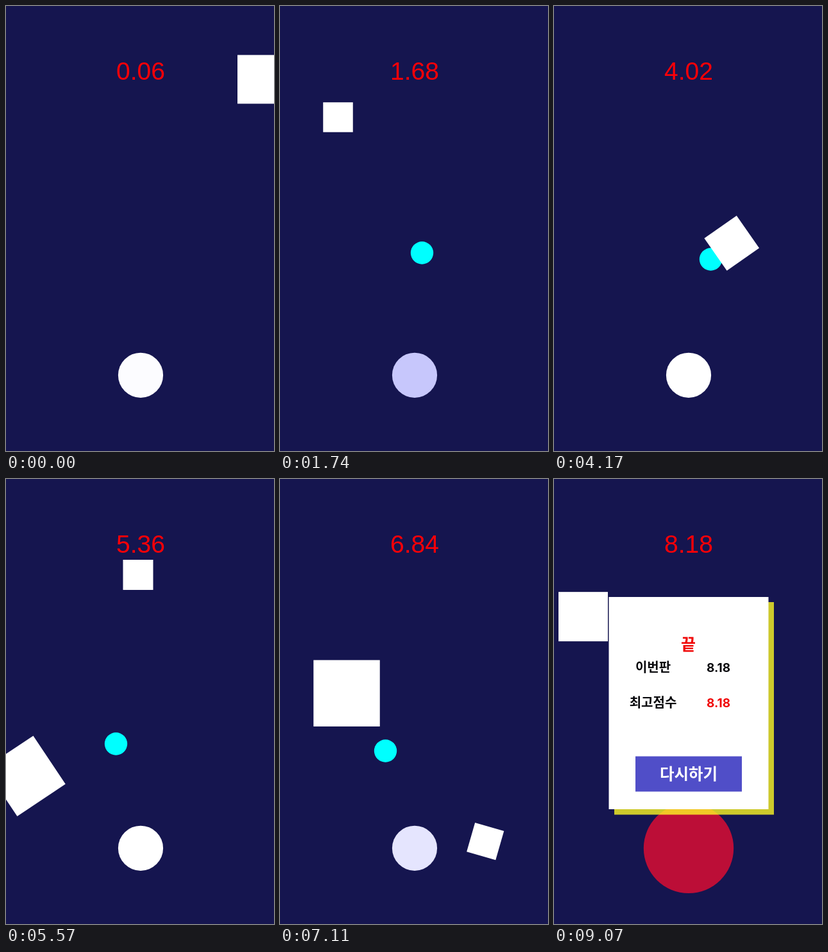
Animation, 418 px wide and 694 px high, one loop 9.34 s. Source, as an HTML page with a canvas:

```html
<!DOCTYPE html>
<html lang="ko">
<head>
<meta charset="utf-8">
<style>
  html, body { margin: 0; height: 100%; overflow: hidden; background: #15154f; }
  canvas { display: block; }
</style>
</head>
<body>
<canvas id="stage" width="418" height="694"></canvas>
<script>
const ctx = document.getElementById('stage').getContext('2d');
const LOOP = 9340, GRAVITY = 681, FIRST_DROP = 0.026;
const SHIELD_TOP = 394, BALLOON_TOP = 541;
const OVER = 8.17, STOP = 8.68, FINAL = '8.18';
const KOREAN = '"Noto Sans CJK KR", "Noto Sans CJK", sans-serif';

// One square drops each second; some bounce off the shield, one off the balloon
const squares = [
  { x: 399, y: 114, size: 76, bounce: { vx: 270, vy: -60, spin: 2.5 } },
  { x: 90.5, y: 26.8, size: 46.5 },
  { x: 409.5, y: 10, size: 67 },
  { x: 247, y: 146, size: 61.5, bounce: { vx: 151, vy: -35, spin: 4.8 } },
  { x: 112, y: 0, size: 90.5, bounce: { vx: -252, vy: 241, spin: -1.81 } },
  { x: 206, y: 110.7, size: 47, bounce: { vx: 122, vy: -111, spin: 0.3 } },
  { x: 104, y: 110.8, size: 103.5, bounce: { vx: -110, vy: 330, spin: -1.8 } },
  { x: 190, y: 58, size: 74, floor: BALLOON_TOP, bounce: { vx: -80, vy: 330, spin: -2 } },
  { x: 45.5, y: 69, size: 77 }
];

// Shield turning points: time, x, y
const path = [
  [0.4, 440, 408], [1.68, 221.5, 385], [2.686, 268.5, 418], [4.025, 244.5, 395],
  [5.363, 171.5, 413], [6.836, 164.5, 424], [8.17, 235, 420]
];

const clamp = v => Math.max(0, Math.min(1, v));
const smooth = v => v * v * (3 - 2 * v);
const mix = (a, b, k) => a + (b - a) * k;
const fall = t => GRAVITY * t * t / 2;

// Screen updates come every 70 ms, a few of them 10 ms early
function tick(ms) {
  if (ms < 140) return 0;
  const early = ms < 600 ? 0 : ms < 2400 ? 10 : 30;
  return 1 + Math.min(128, Math.floor((ms - 140 + early) / 70));
}

function circle(x, y, r, color) {
  ctx.fillStyle = color;
  ctx.beginPath();
  ctx.arc(x, y, r, 0, Math.PI * 2);
  ctx.fill();
}

function rect(x, y, w, h, color) {
  ctx.fillStyle = color;
  ctx.fillRect(x, y, w, h);
}

function label(text, x, y, font, color) {
  ctx.font = font;
  ctx.fillStyle = color;
  ctx.textAlign = 'center';
  ctx.fillText(text, x, y);
}

function drawBalloon(time) {
  const wave = (1 - Math.cos((Math.min(time, OVER) - 0.012) * 3 * Math.PI)) / 2;
  const idle = [255 - 56 * wave, 255 - 56 * wave, 255 - 3 * wave];
  const burst = smooth(clamp((time - OVER) / 0.33));
  const rgb = [188, 14, 55].map((c, i) => Math.round(mix(idle[i], c, burst)));
  circle(210, 575.8, 35.1 * (1 + burst), `rgb(${rgb})`);
}

function drawShield(time) {
  const next = path.findIndex(p => p[0] > time);
  const b = path.at(next);
  const a = next < 1 ? b : path[next - 1];
  const k = a === b ? 0 : smooth((time - a[0]) / (b[0] - a[0]));
  circle(mix(a[1], b[1], k), mix(a[2], b[2], k), 17.7, '#00ffff');
}

function drawSquare({ x, y, size, bounce, floor = SHIELD_TOP }, age) {
  if (age < 0) return;
  const impact = Math.sqrt(2 * (floor - size / 2 - y) / GRAVITY);
  const after = bounce ? Math.max(0, age - impact) : 0;
  const { vx, vy, spin } = bounce || { vx: 0, vy: 0, spin: 0 };
  ctx.save();
  ctx.translate(x + vx * after, y + fall(age - after) + vy * after + fall(after));
  ctx.rotate(spin * after);
  rect(-size / 2, -size / 2, size, size, '#fff');
  ctx.restore();
}

function drawPanel() {
  const small = `bold 20px ${KOREAN}`, digits = 'bold 19px Inter, sans-serif';
  const rows = [['이번판', 301, '#08080c'], ['최고점수', 356, '#f00505']];
  rect(94, 192, 249, 331.5, 'rgba(255,250,35,.79)');
  rect(85.5, 184, 249, 331, '#fff');
  label('끝', 209.5, 267, `bold 25px ${KOREAN}`, '#f00505');
  for (const [name, y, color] of rows) {
    label(name, 154.5, y, small, '#08080c');
    label(FINAL, 256.5, y, digits, color);
  }
  rect(127, 432.5, 166, 55, '#504ec8');
  label('다시하기', 210, 469, `900 24.5px ${KOREAN}`, '#fff');
}

function draw(ms) {
  const step = tick(ms);
  const time = step ? Math.min(0.076 + step * 0.06693, STOP) : 0.06;
  const over = time >= OVER;
  rect(0, 0, 418, 694, '#15154f');
  drawBalloon(time);
  drawShield(time);
  squares.forEach((square, n) => drawSquare(square, time - n - FIRST_DROP));
  label(over ? FINAL : time.toFixed(2), 210, 114.5,
    '39px "Liberation Sans", Arial, sans-serif', '#fc0007');
  if (over) drawPanel();
}

const start = performance.now();
function frame() {
  draw((performance.now() - start) % LOOP);
  requestAnimationFrame(frame);
}
frame();
</script>
</body>
</html>
```
